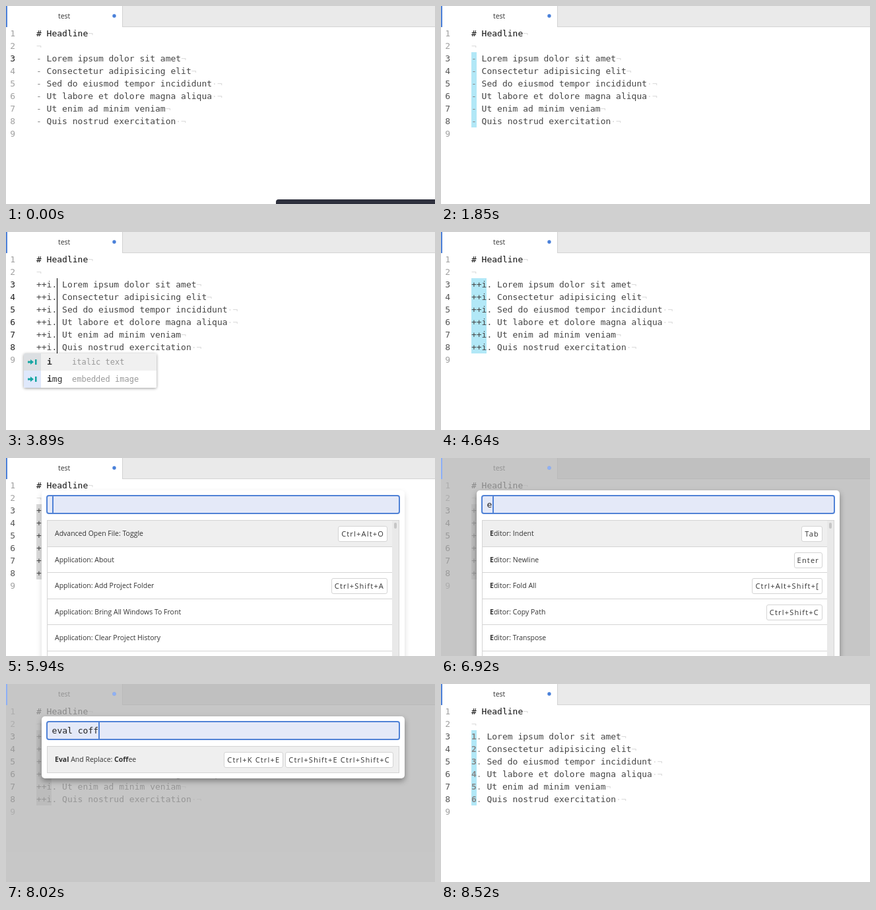
Write an HTML page that moves like this. It is 650 px wide and 300 px high and loops after 9.81 s.

```html
<!DOCTYPE html>
<html lang="en">
<meta charset="utf-8">
<title>Numbering a list</title>
<style>
html, body { margin: 0; width: 100%; height: 100%; overflow: hidden; background: #fff; }
#stage { position: relative; width: 650px; height: 300px; overflow: hidden; background: #fff;
  font: 10.5px "Open Sans", "Noto Sans", sans-serif; color: #333; white-space: pre; }
#stage div { position: absolute; box-sizing: border-box; }
.tabs { left: 0; top: 0; width: 650px; height: 32px; background: #eaeaea; border-bottom: 1px solid #d3d3d3; }
.tab { left: 0; top: 0; width: 177px; height: 32px; background: #fff; line-height: 30px; padding-left: 79px;
  border-right: 1px solid #d3d3d3; }
.edge { left: 0; top: 0; width: 2px; height: 32px; background: #4f82d9; }
.dot { left: 161px; top: 12px; width: 6px; height: 6px; border-radius: 50%; background: #4a80d9;
  transform: scale(.9); }
.pale { background: #8fb0f5; }
.code, .popup, .query { font: 13px/19px "DejaVu Sans Mono", monospace; }
.code { color: #444; }
.code i, .code em { font-style: normal; }
.code i { color: #dadada; }
.code em { color: #888; }
.caret { width: 1px; height: 19px; background: #000; }
.toast { left: 409px; top: 293px; width: 250px; height: 20px; border-radius: 4px; background: #2e303d; }
.popup { left: 27px; top: 184px; width: 201px; height: 52px; background: #fff; border-radius: 2px;
  box-shadow: 0 1px 4px rgba(0,0,0,.4); overflow: hidden; }
.popup div { line-height: 26px; }
.popup small { position: absolute; left: 73px; font-size: 12px; color: #999; }
.popup svg { position: absolute; left: 6px; top: 8px; }
.shade { left: 0; top: 0; width: 650px; height: 300px; background: rgba(179,179,179,.74); }
.modal { left: 54px; top: 49px; width: 550px; background: #fff; border-radius: 5px; }
.query { left: 7px; top: 7px; width: 536px; height: 29px; line-height: 25px; padding-left: 6.6px; color: #222;
  background: #e4e9f8; border: 2px solid #5082d6; border-radius: 4px; }
.query div { top: 0; width: 2px; height: 25px; background: #5082d6; }
.list { left: 8px; top: 45px; width: 534px; border: 1px solid #d4d4d4; overflow: hidden; }
.row { left: 0; height: 39.5px; line-height: 39px; padding-left: 11px; border-bottom: 1px solid #d4d4d4; }
.row:first-child { background: #efefef; }
.keys { right: 8px; top: 8px; display: flex; gap: 3px; }
kbd { font: inherit; font-size: 11px; line-height: 22px; letter-spacing: 1.2px; padding: 0 4px; background: #fff;
  border: 1px solid #d4d4d4; border-radius: 3px; }
.bar { right: 0; top: 0; width: 10px; height: 300px; background: #e9e9e9; }
.thumb { left: 3px; top: 3px; width: 4px; height: 9px; border-radius: 2px; background: #c6c6c6; }
</style>
<div id="stage"></div>
<script>
const LOOP = 9810, CHAR = 7.826, LEFT = 45.98, OPEN = 5940, DONE = 8520;
const stage = document.getElementById('stage');
const items = ['Lorem ipsum dolor sit amet', 'Consectetur adipisicing elit', 'Sed do eiusmod tempor incididunt ',
  'Ut labore et dolore magna aliqua ', 'Ut enim ad minim veniam', 'Quis nostrud exercitation '];
const picked = [640, 1000, 1160, 1330, 1550, 1850];

// Timelines: [start, value]
const prefixes = [[0, '-'], [2830, '+'], [2980, '++'], [3390, '++i'], [3890, '++i.'], [DONE, '#.']];
const carets = [[0, -1], [2830, 1], [2980, 2], [3390, 3], [3890, 4], [4180, 3], [4490, -1]];
const ranges = [[0, [0, 1]], [2830, null], [4490, [2, 3]], [4640, [0, 3]], [DONE, [0, 1]]];
const typed = [[0, ''], [6280, 'e'], [6960, 'ev'], [7150, 'eva'], [7330, 'eval'], [7540, 'eval c'],
  [7790, 'eval cof'], [7980, 'eval coff']];
const filters = [[0, ''], [6920, 'e'], [7010, 'ev'], [7200, 'eva'], [7380, 'eval'], [7590, 'eval c'],
  [7840, 'eval cof'], [8020, 'eval coff']];

const coffee = 'Eval And Replace: Coffee|Ctrl+K Ctrl+E|Ctrl+Shift+E Ctrl+Shift+C';
const script = 'Eval And Replace: Javascript|Ctrl+K Ctrl+J';
const results = {
  '': ['Advanced Open File: Toggle|Ctrl+Alt+O', 'Application: About', 'Application: Add Project Folder|Ctrl+Shift+A',
    'Application: Bring All Windows To Front', 'Application: Clear Project History', ''],
  e: ['Editor: Indent|Tab', 'Editor: Newline|Enter', 'Editor: Fold All|Ctrl+Alt+Shift+[',
    'Editor: Copy Path|Ctrl+Shift+C', 'Editor: Transpose', ''],
  ev: [coffee, script, 'Editor: Move Line Up|Ctrl+Up', 'Editor: Move Line Down|Ctrl+Down', 'Editor: Move To Top', ''],
  eva: [coffee, script, 'Editor: Move To Beginning Of Line'],
  eval: [coffee, script],
  'eval c': [coffee, script]
};

const at = (line, t) => line.filter(e => e[0] <= t).pop()[1];
const div = (cls, style, html = '') => `<div class="${cls}" style="${style}">${html}</div>`;
const code = (x, row, html, color = '') =>
  div('code', `left:${x}px;top:${32 + 19 * row}px;color:${color}`, html);

function editor(t) {
  const prefix = at(prefixes, t), range = at(ranges, t), col = at(carets, t);
  const tint = t >= OPEN && t < DONE ? '#dadada' : '#b2e8f7';
  const number = (row, color = '#a0a0a0') => code(6.17, row, row + 1, color);
  let out = div('tabs', '') + div('tab', '', 'test') + div('edge', '') + div('dot', '') +
    code(LEFT, 0, '# Headline<i>¬</i>', '#111') + code(LEFT, 1, '<i>¬</i>') +
    number(0) + number(1) + number(8);
  items.forEach((item, i) => {
    const row = i + 2, top = 32 + 19 * row, on = range && t >= picked[i];
    const live = on || t >= 2830 || i == 0;
    out += number(row, !live ? '#a0a0a0' : on ? '#555' : '#222');
    if (on) out += div('', `left:${LEFT + range[0] * CHAR}px;top:${top}px;height:19px;` +
      `width:${(range[1] - range[0]) * CHAR}px;background:${tint}`);
    const bullet = prefix.replace('#', `<b style="font-weight:${on ? 600 : 400}">${i + 1}</b>`);
    const head = /^(.|#\.)$/.test(prefix) ? `<em>${bullet}</em>` : bullet;
    out += code(LEFT, row, `${head} ${item.trim()}<i>${item.endsWith(' ') ? '·' : ''}¬</i>`);
    const c = i == 0 && t >= 260 && t < 640 ? 0 : col;
    if (c >= 0) out += div('caret', `left:${Math.floor(46 + c * CHAR)}px;top:${top}px`);
  });
  return out;
}

function popup() {
  const icon = '<svg width="14" height="10" fill="#16a5a3"><path d="M0 3.5h4V1l5 4-5 4V6.5H0zM11 1h2.5v8H11z"/></svg>';
  const row = (y, bg, side, name, note) => div('', `top:${y}px;left:0;width:201px;height:26px;background:${bg}`,
    div('', `left:0;top:0;width:26px;height:26px;background:${side}`, icon) +
    div('', 'left:35px;top:0', name) + `<small>${note}</small>`);
  return div('popup', '', row(0, '#f0f0f0', '#dcdfe2', '<b>i</b>', 'italic text') +
    row(26, '#fff', '#dfe8fb', '<b>i</b>mg', 'embedded image'));
}

function palette(t) {
  const fade = Math.min(4, Math.floor((t - OPEN) / 50)) / 4;
  const query = at(typed, t), filter = at(filters, t);
  const list = results[filter] || [coffee], full = list.length > 5;
  const mark = s => filter.split(' ').filter(Boolean)
    .reduce((s, word) => s.replace(new RegExp(word, 'i'), '<b>$&</b>'), s);
  const rows = list.map((entry, i) => {
    const [name, ...keys] = entry.split('|');
    return div('row', `top:${i * 39.5}px;width:${full ? 523 : 532}px`, mark(name) +
      (keys.length ? div('keys', '', keys.map(k => `<kbd>${k}</kbd>`).join('')) : ''));
  }).join('');
  const height = list.length * 39.5 + 1.5;
  return div('shade', `opacity:${fade}`, div('edge pale', '') + div('dot pale', '')) +
    div('modal', `height:${height + 53}px;box-shadow:0 4px 8px rgba(0,0,0,${.15 + .22 * fade})`,
      div('query', '', query + div('', `left:${Math.round(7 + query.length * CHAR)}px`)) +
      div('list', `height:${height}px`, rows + (full ? div('bar', '', div('thumb', '')) : '')));
}

const start = performance.now();
let last;
function draw() {
  const t = (performance.now() - start) % LOOP;
  let html = editor(t);
  if (t < 260) html += div('toast', '');
  if (t >= 3710 && t < 3930) html += popup();
  if (t >= OPEN && t < DONE) html += palette(t);
  if (html !== last) stage.innerHTML = last = html;
  requestAnimationFrame(draw);
}
draw();
</script>
</html>
```
